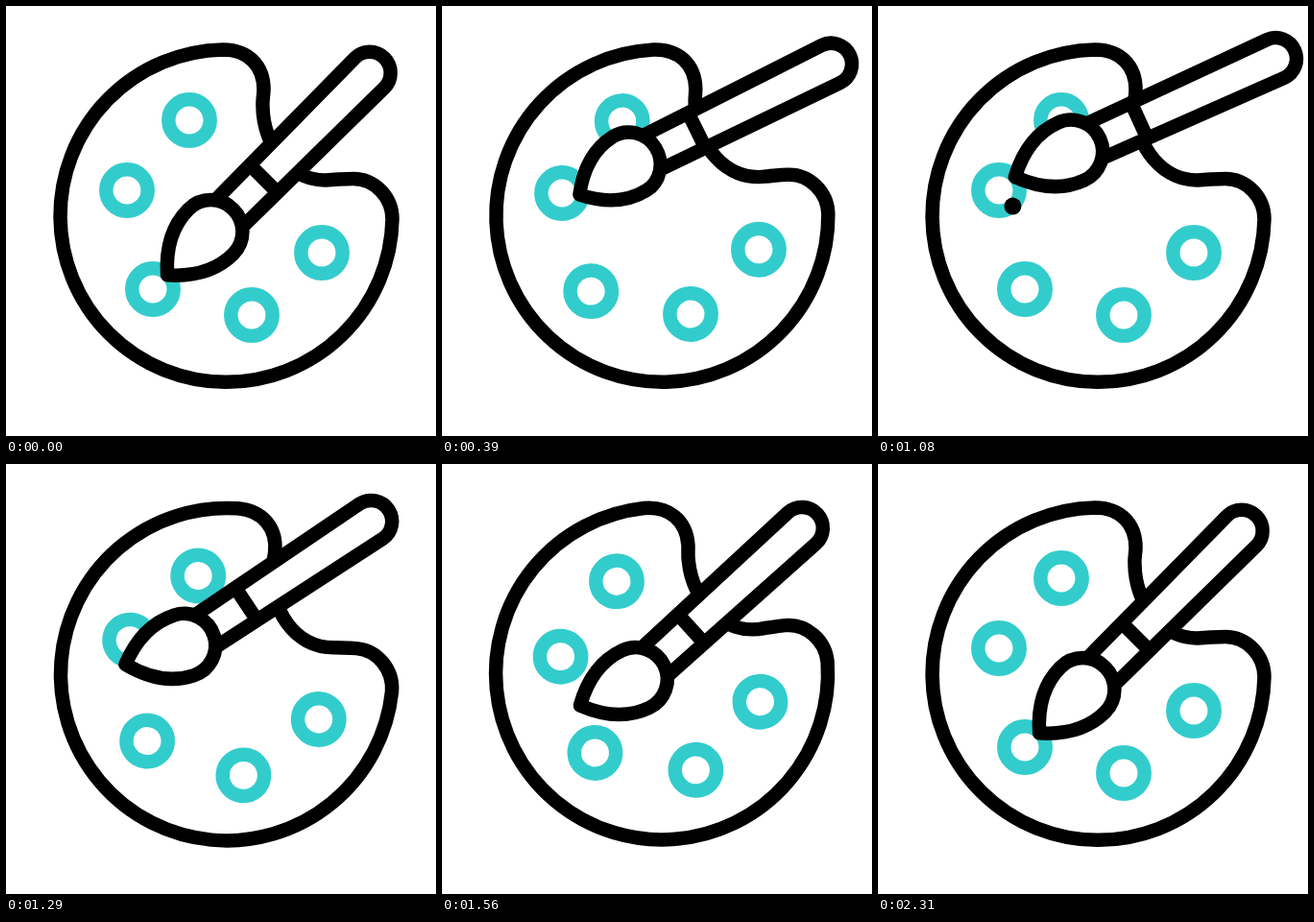
These frames come from a looping animation (448x448 px, 2.46 s). An HTML page:

```html
<!DOCTYPE html>
<html lang="en">
<head>
<meta charset="utf-8">
<title>Palette and brush</title>
<style>
  html, body { margin: 0; width: 100%; height: 100%; overflow: hidden; background: #fff; }
  svg { display: block; width: 100vw; height: 100vh; }
  .line { fill: #fff; stroke: #000; stroke-width: 14.5; stroke-linejoin: round; }
  .ring { fill: none; stroke: #3cc; stroke-width: 14.5; }
</style>
</head>
<body>
<svg viewBox="0 0 448 448">
  <g id="palette">
    <path class="line" d="M226 45.5C252 45.5 269 62 268.5 88C268 96 267 99 267.5 105
      C268 145 296 186 340 181C347 180.7 353 180 362 180C384 180 402.5 199 402.5 222
      A173 173.2 0 1 1 226 45.5Z"/>
    <g class="ring">
      <circle cx="191" cy="119" r="21.7"/>
      <circle cx="126" cy="192" r="21.7"/>
      <circle cx="153" cy="295" r="21.7"/>
      <circle cx="256" cy="322" r="21.7"/>
      <circle cx="329" cy="257" r="21.7"/>
    </g>
    <circle id="dot" r="9"/>
  </g>
  <g id="brush" class="line">
    <path d="M-60-19.8L149-21.8a21.8 21.8 0 0 1 0 43.6L-60 19.8M-7-20.3V20.3"/>
    <g transform="translate(-85)">
      <path id="head" d="M-64 0C-50-16-30-33 0-33A33 33 0 0 1 0 33C-30 33-50 16-64 0Z"/>
    </g>
  </g>
</svg>
<script>
const LOOP = 2460, HALF = 1080, STEP = 30;
const [palette, dot, brush, head] =
  ['palette', 'dot', 'brush', 'head'].map(id => document.getElementById(id));

const clamp = x => Math.min(1, Math.max(0, x));
const smooth = x => (x = clamp(x), x * x * (3 - 2 * x));
const mix = (a, b, p) => a + (b - a) * p;
const arch = x => Math.sin(Math.PI * clamp(x));
const quad = (a, c, b, p) => a.map((v, i) => mix(mix(v, c[i], p), mix(c[i], b[i], p), p));

// Brush poses: middle of the handle axis and tilt
const low = { at: [273.5, 175], tilt: 45 };
const high = { at: [278.5, 116.5], tilt: 24.4 };

// The bristles bend and shorten while the brush travels
const moves = [
  { from: low, to: high, via: [238, 173.25], ring: [126, 192], time: 480,
    ease: smooth, bend: 10, squash: 0.07 },
  { from: high, to: low, via: [235.2, 145], ring: [153, 295], time: 720,
    ease: x => Math.sin(Math.PI / 2 * clamp(x)), bend: -19.5, squash: 0 }
];

// Swing to +5, over to -5, back to rest
const swing = t => 5.2 * smooth(t / 240) - 10.2 * smooth((t - 240) / 240) + 5 * smooth((t - 480) / 240);

// Paint dot runs along a ring, starting under the brush tip
function placeDot(ring, t) {
  const x = (t - 720) / 480;
  const shown = x > 0 && x <= 1;
  if (shown) {
    const a = (-45 + 223 * x ** 3) * Math.PI / 180;
    dot.setAttribute('cx', ring[0] + 22 * Math.cos(a));
    dot.setAttribute('cy', ring[1] + 22 * Math.sin(a));
  }
  return shown;
}

function draw(time) {
  const now = Math.floor(time % LOOP / STEP) * STEP;
  const second = now >= HALF;
  const m = moves[+second];
  const t = second ? now - HALF : now;
  const p = m.ease(t / m.time);
  const flex = arch(t / m.time);
  const [x, y] = quad(m.from.at, m.via, m.to.at, p);

  palette.setAttribute('transform', `rotate(${swing(t)} 224 224)`);
  brush.setAttribute('transform', `translate(${x} ${y}) rotate(${-mix(m.from.tilt, m.to.tilt, p)})`);
  head.setAttribute('transform', `rotate(${-m.bend * flex}) scale(${1 - m.squash * flex} 1)`);

  const shown = placeDot(moves[0].ring, now) || placeDot(moves[1].ring, now - HALF);
  dot.setAttribute('visibility', shown ? 'visible' : 'hidden');
}

const start = performance.now();
function tick() {
  draw(performance.now() - start);
  requestAnimationFrame(tick);
}
tick();
</script>
</body>
</html>
```
